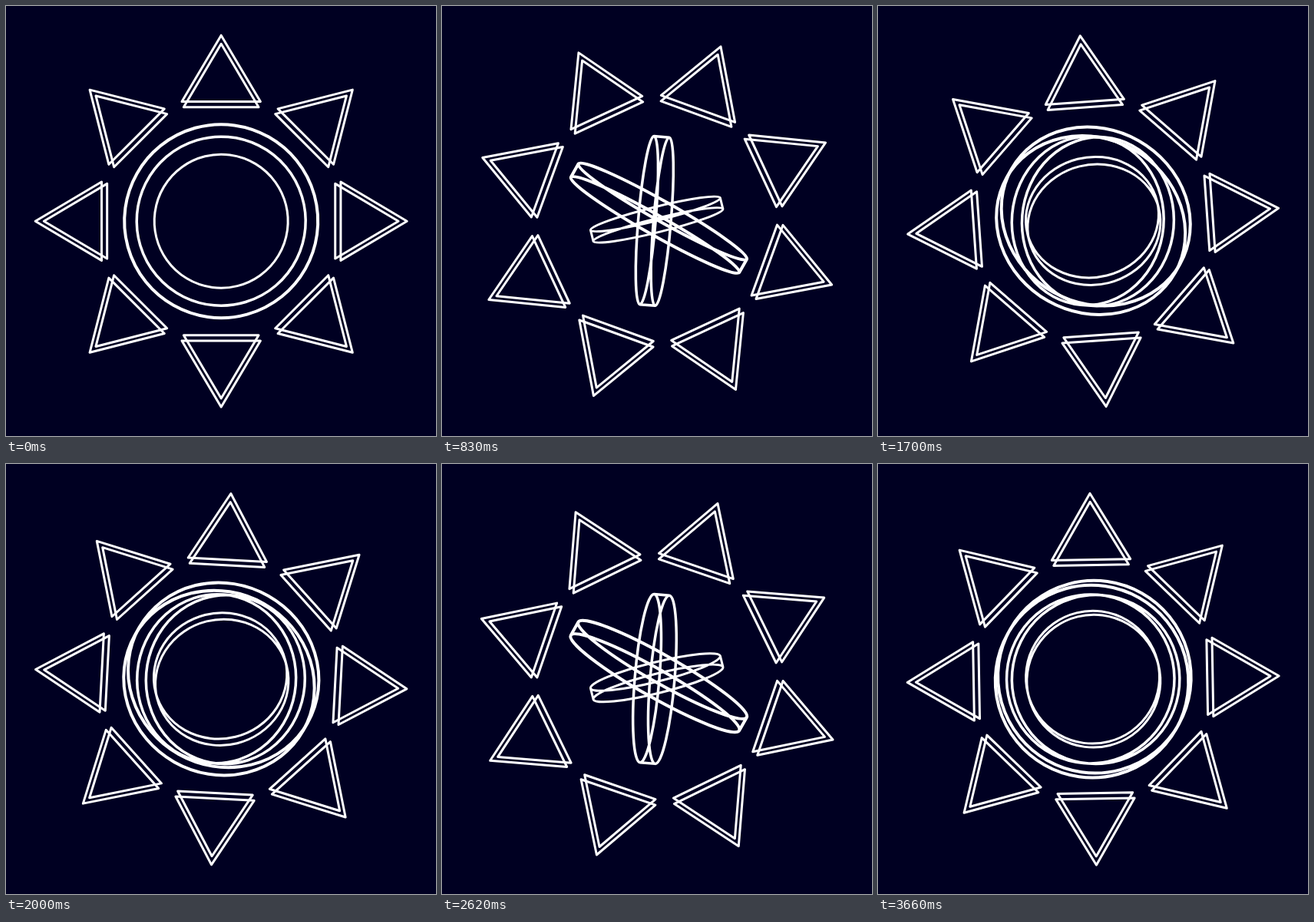
These frames come from a looping animation (560x560 px, 3.7 s). An HTML page with a canvas:

```html
<!DOCTYPE html>
<html lang="en">
<head>
<meta charset="utf-8">
<title>Spinning sun</title>
<style>
  html, body { margin: 0; width: 100%; height: 100%; overflow: hidden; background: #000022; }
  canvas { display: block; width: 560px; height: 560px; }
</style>
</head>
<body>
<canvas id="stage" width="560" height="560"></canvas>
<script>
const ctx = document.getElementById('stage').getContext('2d');
const LOOP = 3700, FPS = 24, RAD = Math.PI / 180;

// radius, hoop width, axis angle, line weight
const rings = [
  { r: 126, depth: 20, axis: 29.5, line: 4 },
  { r: 110, depth: 20, axis: -85.2, line: 3.5 },
  { r: 87, depth: 15, axis: -14, line: 3 }
];

// Each hoop is two parallel circles turning about its own axis.
function drawRing({ r, depth, axis, line }, tilt) {
  const flat = Math.cos(tilt);
  const off = depth * Math.sqrt(Math.sin(tilt)) / 2;
  const lift = r * r / 3200 * (1 - flat);
  ctx.save();
  ctx.rotate(axis * RAD);
  ctx.translate(0, -lift);
  ctx.lineWidth = line;
  ctx.beginPath();
  for (const side of [-off, off]) {
    ctx.moveTo(r, side);
    ctx.ellipse(0, side, r, r * flat, 0, 0, 2 * Math.PI);
  }
  for (const end of [-r, r]) {
    ctx.moveTo(end, -off);
    ctx.lineTo(end, off);
  }
  ctx.stroke();
  ctx.restore();
}

function drawRay(scale) {
  ctx.beginPath();
  ctx.moveTo(0, -242 * scale);
  ctx.lineTo(51.2 * scale, -155.7 * scale);
  ctx.lineTo(-51.2 * scale, -155.7 * scale);
  ctx.closePath();
  ctx.stroke();
}

function draw(time) {
  const tick = Math.floor((Math.floor(time / 10) * 10 + 9.99) * FPS / 1000);
  const step = tick + (tick > 58 ? 1 : 0);

  ctx.setTransform(1, 0, 0, 1, 0, 0);
  ctx.fillStyle = '#000022';
  ctx.fillRect(0, 0, 560, 560);
  ctx.translate(280.2, 280.2);
  ctx.strokeStyle = '#fff';
  ctx.lineJoin = ctx.lineCap = 'round';

  // The hoops pass quickly through the face-on pose and linger edge-on.
  const spin = step * 4 * RAD;
  const tilt = Math.atan2(1.7 * Math.abs(Math.sin(spin)), Math.abs(Math.cos(spin)));
  rings.forEach(ring => drawRing(ring, tilt));

  ctx.lineWidth = 3;
  ctx.rotate(step * RAD);
  for (let i = 0; i < 8; i++) {
    drawRay(1);
    drawRay(.954);
    ctx.rotate(Math.PI / 4);
  }
}

const start = performance.now();
function loop() {
  draw((performance.now() - start) % LOOP);
  requestAnimationFrame(loop);
}
loop();
</script>
</body>
</html>
```
